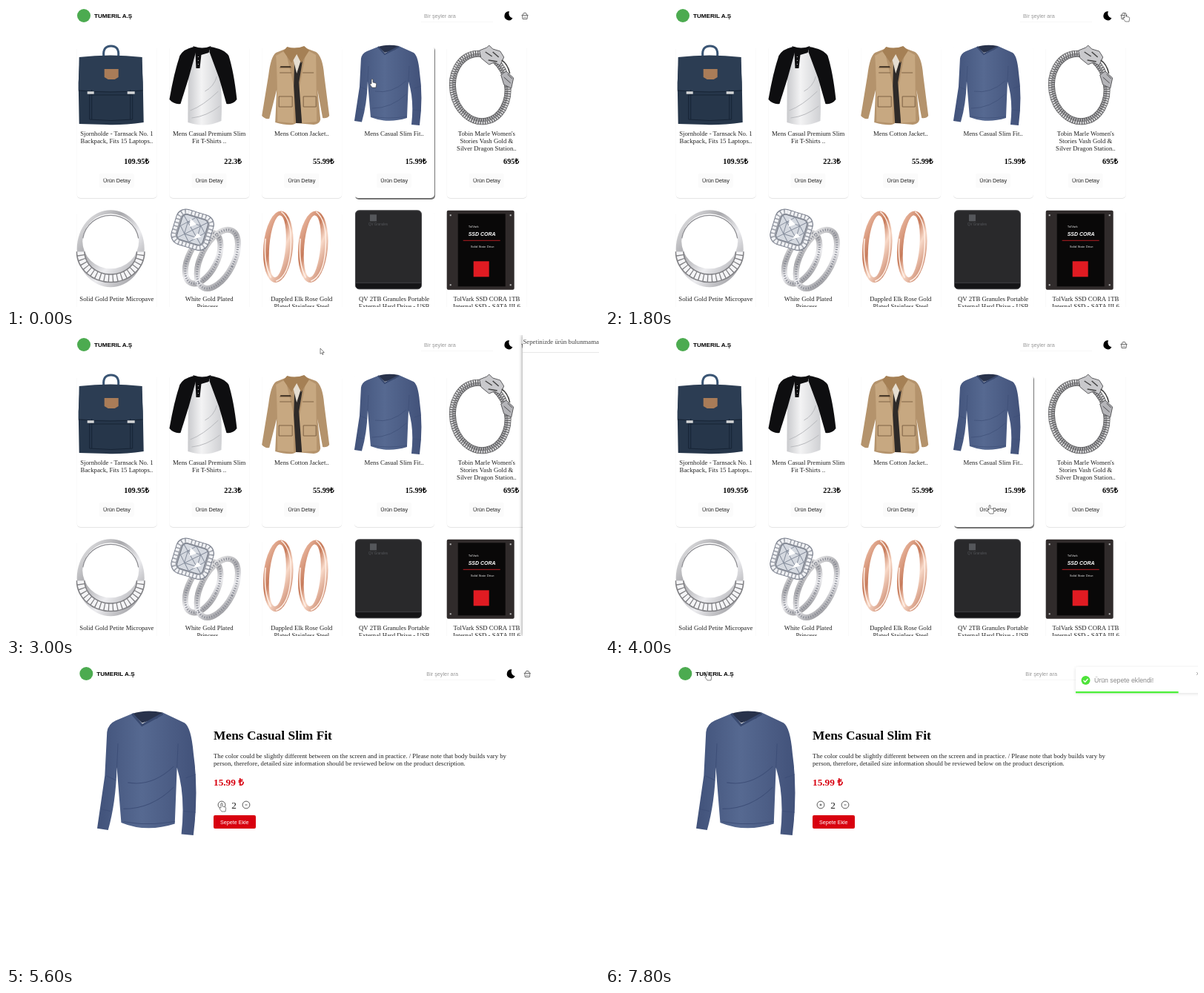
Animation of 800x406 px, one loop 8000 ms. Source, as an HTML page:

```html
<!DOCTYPE html>
<html lang="tr">
<head>
<meta charset="utf-8">
<style>
  html, body { margin: 0; width: 100%; height: 100%; overflow: hidden; background: #fff; }
  svg { display: block; width: 800px; height: 406px; }
  text { font: 8.74px "Liberation Serif", "Times New Roman", serif; fill: #222; }
  .sans { font-family: "Liberation Sans", Arial, sans-serif; }
  .bold { font-weight: bold; fill: #000; }
  .mid { text-anchor: middle; }
  .end { text-anchor: end; }
  .line { fill: none; }
  .card { fill: #fff; filter: drop-shadow(.6px 1px .3px rgba(0, 0, 0, .1)); }
  .card.hover { filter: drop-shadow(1.2px 2px .6px rgba(0, 0, 0, .55)); }
</style>
</head>
<body>
<svg viewBox="0 0 800 406">
  <defs>
    <linearGradient id="silver" x2="1" y2="1">
      <stop stop-color="#f4f4f5"/><stop offset=".35" stop-color="#a9a9ad"/>
      <stop offset=".6" stop-color="#ededf0"/><stop offset="1" stop-color="#85858a"/>
    </linearGradient>
    <linearGradient id="rose" x2="1" y2="1">
      <stop stop-color="#f6cdb8"/><stop offset=".4" stop-color="#c77b5b"/>
      <stop offset=".6" stop-color="#f8d9c8"/><stop offset="1" stop-color="#b9694a"/>
    </linearGradient>
    <linearGradient id="denim">
      <stop stop-color="#41527a"/><stop offset=".45" stop-color="#566991"/><stop offset="1" stop-color="#42527a"/>
    </linearGradient>
    <linearGradient id="cotton">
      <stop stop-color="#c9cacd"/><stop offset=".4" stop-color="#f3f3f4"/><stop offset="1" stop-color="#cfd0d3"/>
    </linearGradient>

    <g id="bag">
      <path class="line" d="M36 14Q35 1 46 1T56 14" stroke="#3a5574" stroke-width="3"/>
      <path fill="#26364a" d="M4 16H87L89 50 90 104Q60 108 40 107L3 106 2 50Z"/>
      <path fill="#2c3d53" d="M3 16Q45 11 88 16L89 60Q45 64 2 60Z"/>
      <path class="line" d="M17 67H75V100Q46 103 17 100ZM20 60V100M72 60V100M2 61Q45 65 89 61" stroke="#172435"/>
      <path fill="#a97c58" d="M37 32H56V43L51 46H42L37 43Z"/>
      <path d="M14 64H23M68 64H78" stroke="#d3d5d6" stroke-width="3.5"/>
    </g>
    <g id="tee">
      <path fill="url(#cotton)" d="M32 4H57L66 24Q72 62 70 102Q48 112 25 104Q25 60 26 34Z"/>
      <path class="line" d="M28 88Q45 82 66 62M30 98Q50 96 68 82M64 42Q60 56 48 62" stroke="#b9babe"/>
      <path fill="#0e0e10" d="M33 2Q19 5 14 14Q6 38 0 73Q6 80 15 79L26 44 36 8Z"/>
      <path fill="#0e0e10" d="M55 2Q74 5 80 14Q87 36 91 73Q86 80 77 79L67 44 54 9Z"/>
      <path fill="#0e0e10" d="M32 1Q44 6 56 1L53 10 43 13 41 31H36L35 9Z"/>
      <path class="line" d="M39 15V28" stroke="#bbb" stroke-width="1.200" stroke-dasharray="1 4"/>
    </g>
    <g id="jacket">
      <path fill="#b4936c" d="M34 4L19 10Q12 15 9 40L0 95Q4 100 10 99L20 60 18 104Q40 110 46 105L70 107Q78 106 79 100L75 60 82 98Q88 99 91 95L84 40Q82 15 73 9L57 3Z"/>
      <path fill="#c7a881" d="M32 7L19 14Q21 40 21 103L43 105V55ZM60 6L73 13 74 103 54 105 50 60Z"/>
      <path fill="#2e2a28" d="M35 7L44 20 43 55 46 105H54L50 50 57 8Z"/>
      <path fill="#e5ddd0" d="M36 6Q47 13 56 6L52 22 47 38 43 22Z"/>
      <path fill="#a58055" d="M34 2Q45 6 57 1L64 7 53 24 47 12 40 24 29 8Z"/>
      <path class="line" d="M24 37H40M55 37H70M23 69H41V83H23ZM56 69H73V83H56ZM24 30H40" stroke="#7f6244"/>
      <path d="M25 29H39" stroke="#4c3c2c" stroke-width="2"/>
    </g>
    <g id="sweater">
      <path fill="url(#denim)" d="M32 2L17 8Q10 11 9 18L7 56 0 102 10 103.500Q17 80 18 49L22 97Q45 106 71 98L73 49Q81 74 77 107L88 108Q93 70 88 36Q86 14 80 10L60 1 41 12Z"/>
      <path fill="#28324b" d="M32 2Q45 -2 60 1L55 6 41 10Z"/>
      <path class="line" d="M32 2L41 12 60 2" stroke="#394a70" stroke-width="2"/>
      <path class="line" d="M18 49L19 28M73 49L74 28M24 85Q50 85 70 66M28 62Q50 66 70 48M24 96Q45 100 71 96M8 56L17 60M81 58L90 55M3 85L12 87M79 87L90 88" stroke="#3e4f78" stroke-width=".7"/>
    </g>
    <g id="bracelet" class="line">
      <g transform="rotate(-10 45 57)">
        <ellipse cx="45" cy="57" rx="37" ry="46" stroke="#5e5e60" stroke-width="9"/>
        <ellipse cx="45" cy="57" rx="39" ry="48" stroke="#d8d8da" stroke-width="3.500" stroke-dasharray="2 1.200"/>
        <ellipse cx="45" cy="57" rx="35" ry="44" stroke="#b4b4b7" stroke-width="3.500" stroke-dasharray="1.600 1.400"/>
      </g>
      <path fill="#c9c9cc" stroke="#5b5b5e" d="M44 7L54 3 57 0 62 5 72 8 77 16 72 27 64 23 57 26 46 17Z"/>
      <path d="M52 9L61 15M62 9L70 16M56 20L68 22M74 20Q82 25 85 38" stroke="#444" stroke-width="1.500"/>
      <path fill="#b4b4b8" stroke="#59595c" d="M73 40L80 35 90 44 87 58 77 53Z"/>
      <path d="M77 43L86 51M82 39L88 45" stroke="#4d4d50"/>
    </g>
    <g id="band">
      <path fill="url(#silver)" fill-rule="evenodd" d="M45.500 0A45.500 52 0 0 1 45.500 104A45.500 52 0 0 1 45.500 0ZM45.500 5A38 37 0 0 0 45.500 79A38 37 0 0 0 45.500 5Z"/>
      <g class="line">
        <path d="M5 56A40.500 36 0 0 0 86 56" stroke="#808084" stroke-width="12"/>
        <path d="M5 56A40.500 36 0 0 0 86 56" stroke="#f4f4f6" stroke-width="9" stroke-dasharray="4.500 1.300"/>
        <path d="M8 38A38 37 0 0 1 83 38" stroke="#8c8c91" stroke-width="1.200"/>
      </g>
    </g>
    <g id="solitaire" class="line">
      <g transform="rotate(27 55 70)" stroke="url(#silver)" stroke-width="8">
        <ellipse cx="44" cy="70" rx="19" ry="37"/><ellipse cx="62" cy="62" rx="22" ry="43"/>
      </g>
      <g transform="rotate(27 55 70)" stroke="#7e818c" stroke-width="3" stroke-dasharray="1 2.300">
        <ellipse cx="44" cy="70" rx="19" ry="37"/><ellipse cx="62" cy="62" rx="22" ry="43"/>
      </g>
      <g transform="rotate(17 31 27)">
        <rect x="5" y="2" width="52" height="49" rx="13" fill="#9b9fa8" stroke="#777d8b"/>
        <rect x="8" y="5" width="46" height="43" rx="11" stroke="#f1f2f5" stroke-width="5" stroke-dasharray="3.500 1.500"/>
        <rect x="13" y="9" width="36" height="35" rx="6" fill="#d5d9e0" stroke="#737985"/>
        <path d="M14 11L48 43M48 11L14 43M31 9L14 26 31 44 48 26ZM22 18H40V35H22Z" stroke="#858d9c"/>
        <path fill="#fff" d="M24 13L34 18 26 24ZM39 29L45 32 35 39Z"/>
      </g>
    </g>
    <g id="hoop" transform="rotate(5 22 50)">
      <path fill="url(#rose)" fill-rule="evenodd" d="M22 1A20 48.500 0 0 1 22 98A20 48.500 0 0 1 22 1ZM21 7A11 42 0 0 0 21 91A11 42 0 0 0 21 7Z"/>
      <path class="line" d="M22 2Q38 12 39 50T23 96M4 40Q4 75 16 92" stroke="#fff0e7" stroke-width="1.500"/>
    </g>
    <g id="hoops"><use href="#hoop"/><use href="#hoop" x="47"/></g>
    <g id="drive">
      <rect x="1.500" y=".5" width="89" height="106" rx="5" fill="#29292b" stroke="#454548"/>
      <path d="M2 98H90" stroke="#3d3d40"/><path fill="#151517" d="M2 99H90V102Q89 106 85 106H7Q2 106 2 102Z"/>
      <rect x="21" y="6" width="9" height="9" fill="#55575b"/>
      <text class="sans" x="19" y="21" style="font-size:4.500px;fill:#55575b">QV Granules</text>
    </g>
    <g id="ssd">
      <rect y=".5" width="91" height="107" rx="2" fill="#302b2b"/>
      <rect x="15" y="5" width="64" height="98" fill="#090808"/>
      <path fill="#bbb" d="M4 6h2v2h-2zM85 6h2v2h-2zM4 100h2v2h-2zM85 100h2v2h-2z"/>
      <text class="sans" x="29" y="24" style="font-size:4.300px;fill:#ddd">TolVark</text>
      <text class="sans" x="29" y="35" style="font-size:7px;font-style:italic;font-weight:bold;fill:#fff">SSD CORA</text>
      <text class="sans" x="32" y="51" style="font-size:4.300px;fill:#ddd">Solid State Drive</text>
      <path d="M22 41H72" stroke="#b51d22"/>
      <rect x="36" y="69" width="21" height="21" fill="#e01b22"/>
    </g>

    <path id="arrow" d="M0 0V7.500L1.800 6 3 8.500 4.100 8 3 5.500H5.300Z" fill="#fff" stroke="#333" stroke-width=".6"/>
    <path id="hand" d="M-1 0Q0 -1 1 0V4L5 5Q6 6 5.500 8L5 11H0L-3 7Q-3 5 -1 6Z" fill="#fff" stroke="#333" stroke-width=".6"/>
  </defs>

  <rect width="800" height="406" fill="#fff"/>
  <g id="header">
    <circle cx="105" cy="13" r="9" fill="#4cab50"/>
    <text class="sans bold" x="119" y="16" style="font-size:8.100px">TUMERIL A.Ş</text>
    <text class="sans" x="564" y="15.500" style="font-size:7.280px;fill:#999">Bir şeyler ara</text>
    <path d="M560 21.500H657" stroke="#f7f7f7"/>
    <path d="M679 7.300A6 6 0 1 0 683.500 16.500A6.500 6.500 0 0 1 679 7.300Z"/>
    <path class="line" d="M695.500 12.500H704.500M696.500 13L697 17.500H703L703.500 13M697 12L698.500 9.500H701.500L703 12M699 14.500V16M701 14.500V16" stroke="#444" stroke-width=".8"/>
    <g id="badge">
      <circle cx="704.500" cy="9" r="4.200" fill="#e0202a"/>
      <text class="sans mid" x="704.500" y="11" style="font-size:5.500px;fill:#fff">1</text>
    </g>
  </g>

  <g id="shop"></g>

  <g id="detail">
    <use href="#sweater" transform="translate(123 64) scale(1.475 1.546)"/>
    <text class="bold" x="280" y="102" style="font-size:17.400px">Mens Casual Slim Fit</text>
    <text x="280" y="126.500">The color could be slightly different between on the screen and in practice. / Please note that body builds vary by</text>
    <text x="280" y="136.500">person, therefore, detailed size information should be reviewed below on the product description.</text>
    <text class="bold" x="280" y="164" style="font-size:13.300px;fill:#d8000f">15.99 ₺</text>
    <g class="line" stroke="#333" stroke-width=".8">
      <circle cx="291" cy="190" r="4.900"/><circle cx="324" cy="190" r="4.900"/>
      <path d="M289.500 190h3M291 188.500v3M322.500 190h3"/>
    </g>
    <text id="count" class="mid" x="307.500" y="194.500" style="font-size:13.300px"></text>
    <rect id="add" x="280" y="204" width="57" height="18" rx="2"/>
    <text class="sans mid" x="308.300" y="215.500" style="font-size:7.150px;fill:#fff">Sepete Ekle</text>
  </g>

  <rect id="shade" width="800" height="406"/>
  <g id="drawer">
    <rect width="324" height="406" fill="#fff" style="filter:drop-shadow(-1px 0 2px rgba(0,0,0,.35))"/>
    <text x=".5" y="12.300" style="fill:#444">Sepetinizde ürün bulunmamaktadır..</text>
    <path d="M0 23.500H324" stroke="#e8e8e8"/>
    <text class="bold" x="234" y="50.300" style="fill:#222">Toplam Tutar : 0.00 TL</text>
  </g>
  <g id="toast">
    <rect y="4" width="175" height="35" rx="2" fill="#fff" style="filter:drop-shadow(0 1px 2px rgba(0,0,0,.12))"/>
    <rect id="progress" y="37" height="2.300" fill="#4df03a"/>
    <circle cx="13.500" cy="22" r="6" fill="#4de339"/>
    <path class="line" d="M10.500 22L12.700 24.300 16.500 20" stroke="#fff" stroke-width="1.300"/>
    <text class="sans" x="25" y="25" style="fill:#888">Ürün sepete eklendi!</text>
    <path d="M163 11l4 4m0-4l-4 4" stroke="#aaa"/>
  </g>
  <use id="cursor"/>
</svg>

<script>
const LOOP = 8000, STEP = 200;
const el = id => document.getElementById(id);

const products = [
  ['bag', '109.95', 'Sjornholde - Tarnsack No. 1', 'Backpack, Fits 15 Laptops..'],
  ['tee', '22.3', 'Mens Casual Premium Slim', 'Fit T-Shirts ..'],
  ['jacket', '55.99', 'Mens Cotton Jacket..'],
  ['sweater', '15.99', 'Mens Casual Slim Fit..'],
  ['bracelet', '695', "Tobin Marle Women's", 'Stories Vash Gold &amp;', 'Silver Dragon Station..'],
  ['band', '', 'Solid Gold Petite Micropave'],
  ['solitaire', '', 'White Gold Plated', 'Princess..'],
  ['hoops', '', 'Dappled Elk Rose Gold', 'Plated Stainless Steel'],
  ['drive', '', 'QV 2TB Granules Portable', 'External Hard Drive - USB'],
  ['ssd', '', 'TolVark SSD CORA 1TB', 'Internal SSD - SATA III 6']
];
const cardAt = i => ({ x: 95.7 + i % 5 * 124.75, y: i < 5 ? 53 : 275.3 });

el('shop').innerHTML = products.map(([art, price, ...lines], i) => {
  const { x, y } = cardAt(i);
  return `<g transform="translate(${x} ${y})">
    <rect class="card" width="108" height="206" rx="5"/>
    <use href="#${art}"/>
    ${lines.map((line, n) => `<text class="mid" x="53.700" y="${122.3 + n * 10}">${line}</text>`).join('')}
    <text class="bold end" x="97.500" y="160.300" style="font-size:10.200px">${price}₺</text>
    <rect x="30" y="173" width="47" height="19" rx="2" fill="#fbfbfb"/>
    <text class="sans mid" x="53.700" y="184.700" style="font-size:7.280px">Ürün Detay</text>
  </g>`;
}).join('');
const cards = [...document.querySelectorAll('.card')];

// Key rows: time, then values that are interpolated linearly.
const cursorKeys = [
  [0, 494, 99], [400, 512, 92], [800, 610, 45], [1200, 699, 11], [1400, 702, 10], [1800, 702, 10],
  [2000, 640, 23], [2400, 560, 21], [2800, 424, 18], [3200, 424, 18], [3600, 480, 110],
  [4000, 519, 230], [4800, 519, 230], [5000, 420, 215], [5400, 291, 188], [5800, 291, 188],
  [6000, 305, 205], [6200, 319, 210], [6400, 319, 210], [6600, 358, 205], [7000, 358, 205],
  [7200, 300, 150], [7600, 150, 20], [7800, 138, 11]
];
const drawerKeys = [[1800, 800], [2000, 485], [2200, 476], [2800, 476], [3000, 697], [3200, 800]];
const shadeKeys = [[1800, 0], [2000, .44], [2200, .5], [2800, .5], [3000, 0]];
const toastKeys = [[6400, 800], [6600, 716], [6800, 635]];

function sample(keys, t) {
  const next = keys.findIndex(key => key[0] > t);
  if (next < 0) return keys.at(-1).slice(1);
  if (next === 0) return keys[0].slice(1);
  const a = keys[next - 1], b = keys[next];
  const k = (t - a[0]) / (b[0] - a[0]);
  return a.slice(1).map((v, i) => v + (b[i + 1] - v) * k);
}

const within = (x, y, left, top, w, h) => x >= left && x <= left + w && y >= top && y <= top + h;
const show = (id, visible) => el(id).setAttribute('visibility', visible ? 'visible' : 'hidden');
const move = (id, x, y = 0) => el(id).setAttribute('transform', `translate(${x} ${y})`);

function draw(t) {
  const onDetail = t >= 4400;
  const [x, y] = sample(cursorKeys, t);
  const [drawerX] = sample(drawerKeys, t);
  const [toastX] = sample(toastKeys, t);

  show('shop', !onDetail);
  show('detail', onDetail);
  move('header', onDetail ? 3.3 : 0);
  show('badge', t >= 6400);

  let overCard = false;
  cards.forEach((card, i) => {
    const pos = cardAt(i);
    const hover = !onDetail && within(x, y, pos.x, pos.y, 108, 206);
    card.classList.toggle('hover', hover);
    overCard ||= hover;
  });

  el('count').textContent = t < 5400 ? 1 : 2;
  el('add').setAttribute('fill', t >= 6000 && t < 6800 ? '#8e0913' : '#d8000f');

  el('shade').setAttribute('opacity', sample(shadeKeys, t)[0]);
  show('drawer', drawerX < 800);
  move('drawer', drawerX);

  show('toast', toastX < 800);
  move('toast', toastX);
  el('progress').setAttribute('width', 165 * (1 - Math.max(0, t - 7000) / 5000));

  const overLink = within(x, y, 694, 6, 14, 13) && t < 2000
    || onDetail && (within(x, y, 286, 185, 10, 10) || within(x, y, 280, 204, 57, 18) || within(x, y, 98, 3, 78, 20));
  el('cursor').setAttribute('href', overCard || overLink ? '#hand' : '#arrow');
  move('cursor', x, y);
}

function tick(now) {
  draw(Math.floor(now % LOOP / STEP) * STEP);
  requestAnimationFrame(tick);
}
tick(performance.now());
</script>
</body>
</html>
```
